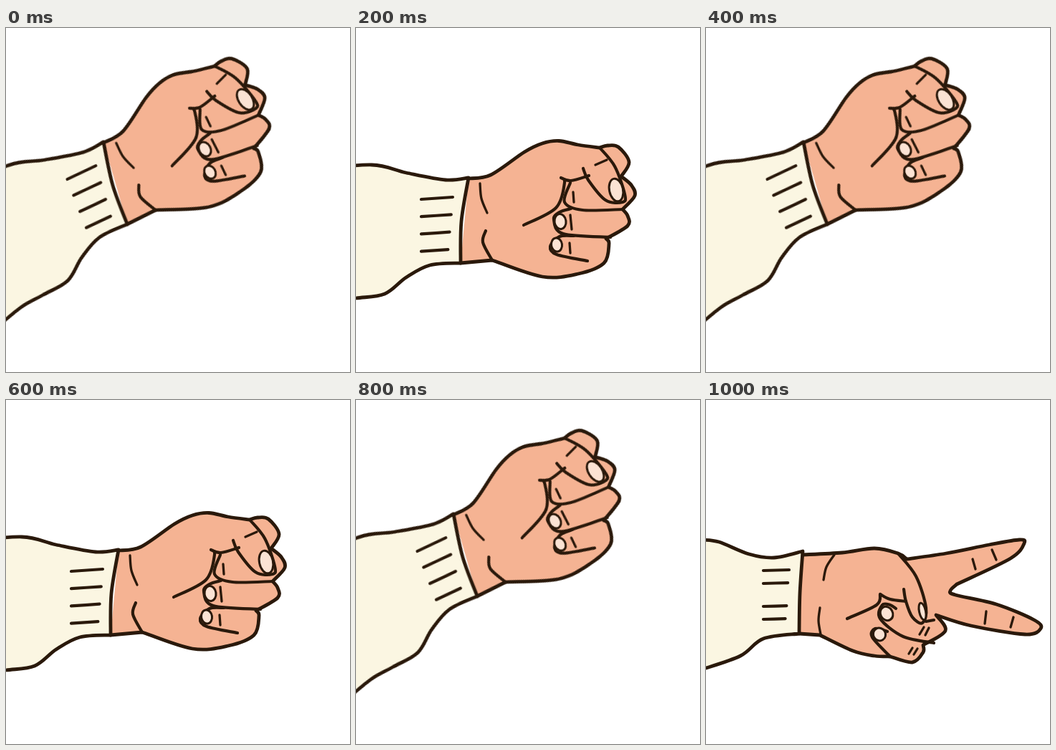
An HTML page that plays this animation: 480 px wide and 480 px high, repeating every 1.2 s.

```html
<!DOCTYPE html>
<html lang="en">
<head>
<meta charset="utf-8">
<title>Rock, paper, scissors</title>
<style>
  html, body { margin: 0; width: 100%; height: 100%; overflow: hidden; background: #fff; }
  svg { display: block; width: 100%; height: 100%; }
  path, ellipse { fill: none; stroke: #2a190b; stroke-linecap: round; stroke-linejoin: round; }
  .skin, .wool { stroke-width: 4.8; }
  .skin { fill: #f5b393; }
  .wool { fill: #fbf6e2; }
  .line { stroke-width: 4.2; }
  .nail { fill: #fbe3d4; stroke-width: 3; }
  .crease { stroke-width: 3.3; }
  #fist { transform-origin: 157px 209px; animation: swing 1200ms step-end infinite; }
  #scissors { animation: reveal 1200ms step-end infinite; }
  @keyframes swing {
    0%, 33.3333%, 66.6667% { transform: translate(-21px, -50px) rotate(-21.4deg); visibility: visible; }
    16.6667%, 50% { transform: none; visibility: visible; }
    83.3333%, 100% { transform: none; visibility: hidden; }
  }
  @keyframes reveal {
    0%, 100% { visibility: hidden; }
    83.3333% { visibility: visible; }
  }
</style>
</head>
<body>
<svg viewBox="0 0 480 480">
  <g id="fist"></g>
  <g id="scissors"></g>
</svg>
<script>
// Smooth curve through "x,y" points; "|" makes the point before it a sharp corner.
function curve(text) {
  let last = [], d = '';
  for (const run of text.split('|')) {
    const pts = [...last, ...run.trim().split(/\s+/).map(p => p.split(',').map(Number))];
    d = d || 'M' + pts[0];
    for (let i = 0; i < pts.length - 1; i++) {
      const b = pts[i], c = pts[i + 1], a = pts[i - 1] || b, e = pts[i + 2] || c;
      const out = b.map((v, k) => v + (c[k] - a[k]) / 6);
      const into = c.map((v, k) => v - (e[k] - b[k]) / 6);
      d += `C${out} ${into} ${c}`;
    }
    last = pts.slice(-1);
  }
  return d;
}

function pen(id) {
  const group = document.getElementById(id);
  const add = (tag, attrs) => {
    const el = document.createElementNS('http://www.w3.org/2000/svg', tag);
    for (const name in attrs) el.setAttribute(name, attrs[name]);
    group.append(el);
  };
  const path = kind => (...shapes) => shapes.forEach(s => add('path', { class: kind, d: curve(s) }));
  return {
    skin: path('skin'), wool: path('wool'), line: path('line'), crease: path('crease'),
    nail: (cx, cy, rx, ry, turn) =>
      add('ellipse', { class: 'nail', cx, cy, rx, ry, transform: `rotate(${turn} ${cx} ${cy})` }),
    // Four ribs on the cuff, each a little shorter, with an optional wider middle gap.
    ribs(x, y, step, length, rise, gap = 0) {
      for (let i = 0; i < 4; i++) {
        const top = y + i * step + (i > 1 ? gap : 0), size = 1 - 0.05 * i;
        path('line')(`${x},${top} ${x + length * size},${top - rise * size}`);
      }
    }
  };
}

const fist = pen('fist');
fist.skin(`157,210 188,205 235,173 260,161 283,157.5 310,163 340,167 | 351,164 366,166 381,187 370,207 |
  384,219 389,234 372,253 | 379,262 379,276 349,294 | 353,301 346,328 310,343 260,347 190,324 | 146,328`);
fist.wool(`-60,198 22,191 70,202 125,212 157,209 | 147,270 146,328 |
  103,331 70,348 40,371 0,377 -35,382 -80,397`);
fist.ribs(91, 239, 24.2, 44, 3);
fist.line(
  '340,167 361,193 375,232 372,243 348,240 324,212 317,196',
  '325,206 300,213 286,209 | 291,216 279,251 234,275',
  '299,216 291,243 316,254 372,253',
  '300,252 284,257 276,267 289,287 355,292',
  '304,290 284,291 271,305 280,316 323,325',
  '181,283 177,299 190,324');
fist.nail(363, 226, 9.5, 16, -12);
fist.nail(285, 270, 8, 10.5, -8);
fist.nail(280, 302.5, 7.5, 9.5, -8);
fist.crease('334,191 350,184', '303,229 304,243', '299,261 301,281', '298,300 299,314', '173,217 175,238 183,258');

const scissors = pen('scissors');
scissors.skin(`133,216 190,213 235,207 268,214 280,222 | 335,214 395,202 437,195 444,200 425,221 350,257 |
  341,266 348,272 405,285 458,307 467,319 445,327 370,315 321,300 | 334,322 303,342 |
  303,352 288,366 257,358 | 235,357 205,350 159,328 | 130,326`);
scissors.wool('-6,195 18,198 60,215 95,220 135,211 | 131,270 130,326 | 80,333 48,357 -6,376');
scissors.ribs(80, 238, 18, 36, 1, 14);
scissors.line(
  '268,214 293,246 307,290 302,311 288,303 279,281 276,264',
  '279,281 257,278 243,271 | 238,286 197,305',
  '265,291 257,286 246,286 243,305 275,330 318,339',
  '253,323 236,319 232,331 257,358',
  '307,309 318,307');
scissors.nail(302, 295, 4.5, 12, -12);
scissors.nail(252, 298, 8.5, 10, -30);
scissors.nail(242, 327, 8.5, 9, -30);
scissors.crease(
  '372,222 376,236', '399,209 405,223', '391,295 389,312', '429,303 425,317',
  '298,327 304,317', '306,328 311,318', '283,354 288,346', '290,355 295,347',
  '179,216 168,233 164,251', '159,290 157,308 160,327');
</script>
</body>
</html>
```
